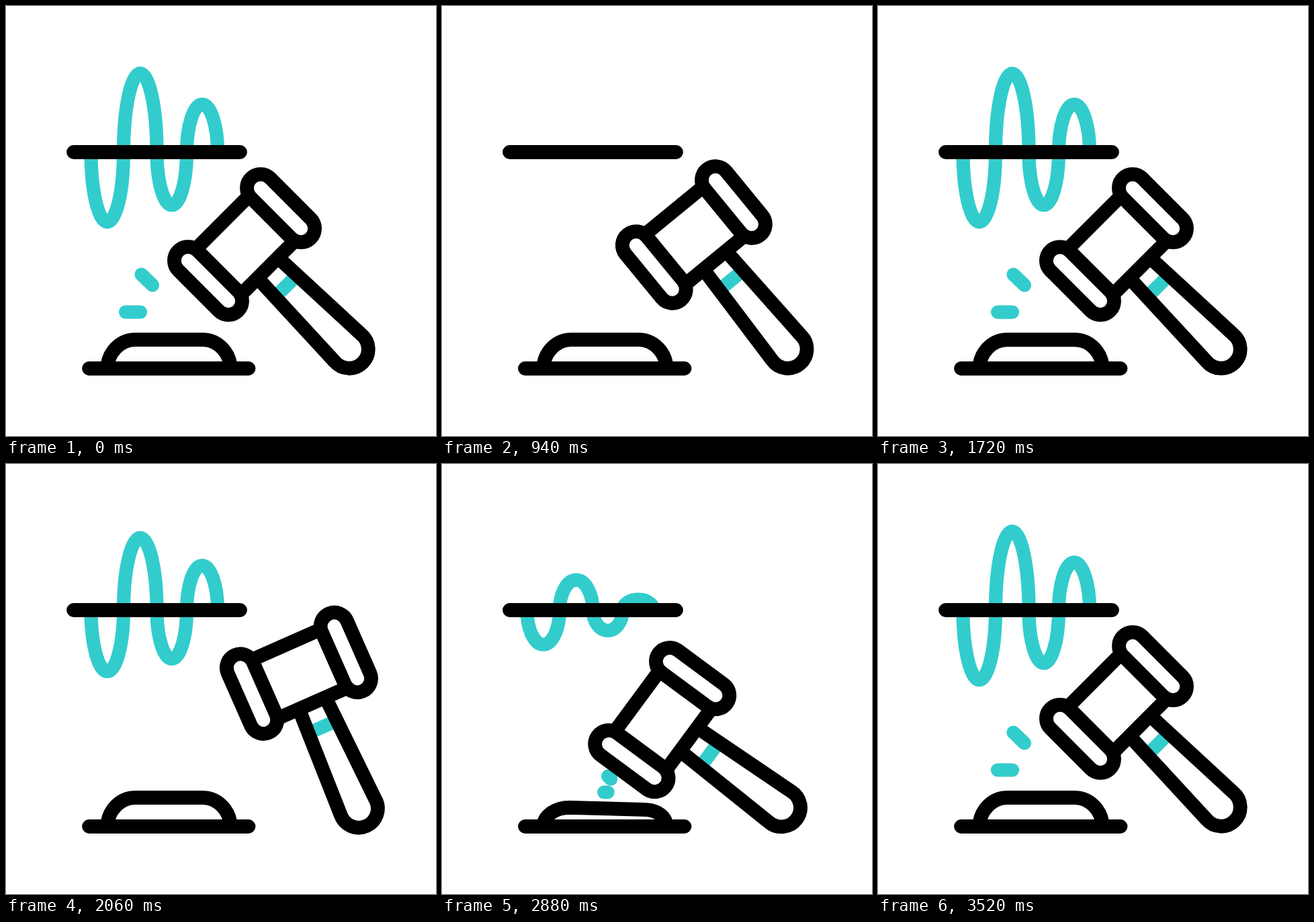
An HTML page that plays this animation: 640 px wide and 640 px high, repeating every 3600 ms.

```html
<!DOCTYPE html>
<html lang="en">
<head>
<meta charset="utf-8">
<title>Gavel</title>
<style>
  html, body { margin: 0; width: 100%; height: 100%; overflow: hidden; background: #fff; }
  svg { display: block; width: 100%; height: 100%; }
  path, rect { fill: none; stroke: #000; stroke-width: 20.8; stroke-linecap: round; }
  .teal { stroke: #3cc; stroke-width: 20.2; }
  .flat { stroke-linecap: butt; }
</style>
</head>
<body>
<svg viewBox="0 0 640 640">
  <path id="wave" class="teal flat"/>
  <path id="sparks" class="teal"/>
  <path d="M100.500 217.500H348.500M123.500 539.500H361"/>
  <path id="block" class="flat"/>
  <g id="gavel">
    <g transform="translate(355 355) rotate(-45)">
      <path class="teal flat" d="M-21 87.500H21"/>
      <path class="flat" d="M-21.500 48L-28.300 218A28.400 28.400 0 1 0 28.300 218L21.500 48"/>
      <path class="flat" d="M-60 -46.500H60M-60 49H60"/>
      <rect x="-96.900" y="-63" width="41" height="126" rx="20.500"/>
      <rect x="55.900" y="-63" width="41" height="126" rx="20.500"/>
    </g>
  </g>
</svg>
<script>
const LOOP = 3600, START = 40, CYCLE = 1720;
const RAISE = 320, FALL = 535, HIT = 1040;
const UP = 21.4, DOWN = -20;

const $ = id => document.getElementById(id);
const clamp = x => Math.min(1, Math.max(0, x));
const smooth = x => (x = clamp(x), x * x * (3 - 2 * x));

// Half-waves: end x, direction, full height, rebound travel, collapse start
const bumps = [
  [175, 1, 104, 123, 207],
  [224.5, -1, 117.3, 169, 225],
  [269, 1, 79, 113.5, 225],
  [315, -1, 71.2, 129, 233]
];
// Sparks: centre, half length vector, travel from the impact point
const sparks = [
  [189, 455.5, 11, 0, 128, 77],
  [209.75, 407.5, 8.25, 8, 92, 138]
];

// Distance left to the rest pose after the hit: 1 at impact, 0 at rest
const recoil = u => (1 - Math.sqrt(clamp((u - HIT) / (CYCLE - HIT)))) ** 2;

function swing(u) {
  if (u >= HIT) return DOWN * recoil(u);
  return UP * smooth(u / RAISE) + (DOWN - UP) * clamp((u - FALL) / (HIT - FALL)) ** 3;
}

function wavePath(u) {
  let x = 126.5, d = `M${x} 217.5`;
  for (const [end, dir, full, travel, start] of bumps) {
    const h = u < HIT
      ? full * (1 - smooth((u - start) / 430))
      : Math.max(0, full - travel * recoil(u));
    d += `A${(end - x) / 2} ${h} 0 0 ${dir > 0 ? 0 : 1} ${end} 217.5`;
    x = end;
  }
  return d;
}

function sparkPath(u) {
  const hit = u >= HIT, r = hit ? recoil(u) : 0;
  const size = hit ? 1 - 1.75 * r : 1 - smooth(u / 200);
  if (size <= 0) return "";
  const tail = hit ? -size : -1, head = hit ? size : 2 * size - 1;
  return sparks.map(([x, y, hx, hy, dx, dy]) => {
    const at = k => `${x + dx * r + hx * k} ${y + dy * r + hy * k}`;
    return `M${at(tail)}L${at(head)}`;
  }).join("");
}

function blockPath(press) {
  const left = 192 - 5 * press, right = 293 + 15 * press;
  const l = 496.7 + 34 * press, r = 496.7 + 41 * press;
  const cl = l + (539.5 - l) * 0.45, cr = r + (539.5 - r) * 0.45;
  return `M151 539.5C151 ${cl} ${left - 22} ${l} ${left} ${l}` +
    `L${right} ${r}C${right + 22} ${r} 334 ${cr} 334 539.5`;
}

function draw() {
  const t = performance.now() % LOOP - START;
  const u = t < 0 || t >= 2 * CYCLE ? 0 : t % CYCLE;
  const angle = swing(u);
  $("gavel").setAttribute("transform", `rotate(${angle} 512.5 549.5)`);
  $("wave").setAttribute("d", wavePath(u));
  $("sparks").setAttribute("d", sparkPath(u));
  $("block").setAttribute("d", blockPath(clamp(angle / DOWN)));
  requestAnimationFrame(draw);
}
draw();
</script>
</body>
</html>
```
